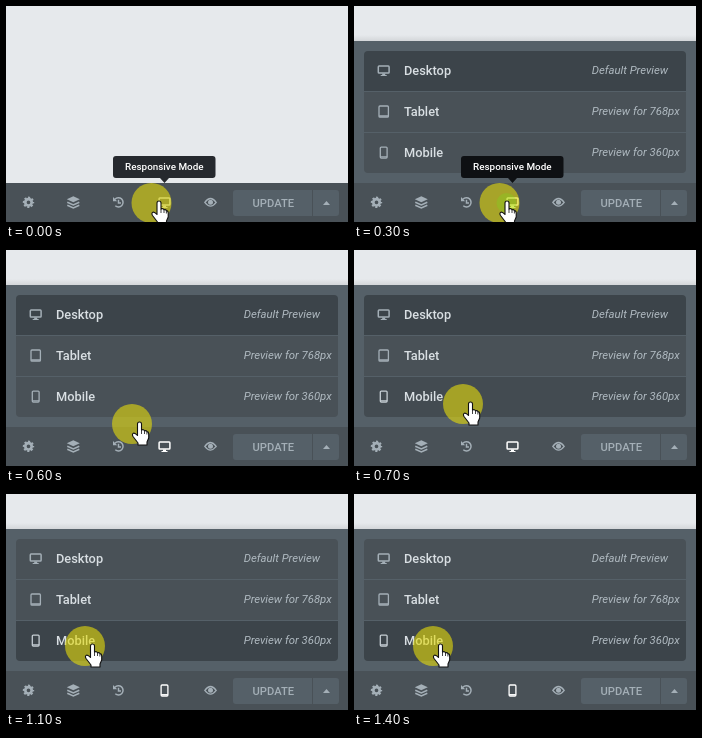
Write an HTML page that moves like this. It is 342 px wide and 216 px high and loops after 1.6 s.

```html
<!DOCTYPE html>
<html>
<head>
<meta charset="utf-8">
<style>
html, body { margin: 0; width: 100%; height: 100%; overflow: hidden; background: #e6e9ec; }
svg { display: block; font-family: Roboto, sans-serif; }
.icon { color: #a4afb7; }
.label { font-size: 12.8px; font-weight: 500; fill: #d9dfe3; }
.note { font-size: 11.35px; font-style: italic; fill: #b0bac1; }
</style>
</head>
<body>
<svg width="342" height="216" viewBox="0 0 342 216">
  <defs>
    <linearGradient id="shade" x2="0" y2="1">
      <stop stop-color="#000" stop-opacity="0"/>
      <stop offset="1" stop-color="#000" stop-opacity=".08"/>
    </linearGradient>
    <clipPath id="card"><rect x="10" y="45" width="322" height="122" rx="4"/></clipPath>
    <g id="desktop">
      <rect x="-5.400" y="-4.500" width="10.800" height="7" rx=".8" fill="none" stroke="currentColor" stroke-width="1.500"/>
      <path d="M-1.500 3h3v1.500h1.500v1h-6v-1h1.500z" fill="currentColor"/>
    </g>
    <g id="tablet" fill="none" stroke="currentColor" stroke-width="1.300">
      <rect x="-4.700" y="-5.600" width="9.400" height="11.200" rx="1"/>
      <path d="M-4.500 4.400h9"/>
    </g>
    <g id="mobile" fill="none" stroke="currentColor" stroke-width="1.300">
      <rect x="-3.400" y="-5.500" width="6.800" height="11" rx="1"/>
      <path d="M-3.400 4.200h6.800"/>
    </g>
  </defs>

  <g id="panel">
    <rect y="29" width="342" height="6" fill="url(#shade)"/>
    <rect y="35" width="342" height="142" fill="#556068"/>
    <g id="rows" clip-path="url(#card)"></g>
  </g>

  <rect y="177" width="342" height="39" fill="#495157"/>
  <g class="icon" fill="currentColor">
    <g transform="translate(22.500 196.300)">
      <circle r="3.200" fill="none" stroke="currentColor" stroke-width="2.700"/>
      <circle r="4.700" fill="none" stroke="currentColor" stroke-width="2" stroke-dasharray="2.100 1.591" stroke-dashoffset="1.050"/>
    </g>
    <g transform="translate(67.300 196.300)">
      <path d="M0-6L6.500-3 0 0-6.500-3z"/>
      <path d="M-6 0L0 2.700 6 0M-6 3L0 5.700 6 3" fill="none" stroke="currentColor" stroke-width="1.500"/>
    </g>
    <g transform="translate(112.500 196.300)" fill="none" stroke="currentColor" stroke-width="1.500">
      <path d="M-3.500-3A4.600 4.600 0 1 1-3.200 3.400M0-2.600V.6H2.500"/>
      <path d="M-5.500-5.200v4.200h4.200z" fill="currentColor" stroke="none"/>
    </g>
    <g transform="translate(204.500 196.300)">
      <path d="M-5.700 0Q0-7.600 5.700 0Q0 7.600-5.700 0z" fill="none" stroke="currentColor" stroke-width="1.300"/>
      <circle r="2.500"/>
    </g>
  </g>
  <path d="M230 184h76v26h-76q-3 0-3-3v-20q0-3 3-3zM307 184h23q3 0 3 3v20q0 3-3 3h-23z" fill="#556068"/>
  <text x="246.500" y="201" font-size="11.200" font-weight="500" fill="#a4afb7">UPDATE</text>
  <path d="M317 199h7l-3.500-4z" fill="#a4afb7"/>
  <use id="device" x="158.500" y="196.500"/>

  <g id="tip">
    <path d="M110 150h96.500q3 0 3 3v16q0 3-3 3h-43.500l-4.500 5-4.500-5h-44q-3 0-3-3v-16q0-3 3-3z"/>
    <text x="119" y="164" font-size="9.900" font-weight="500" fill="#fff">Responsive Mode</text>
  </g>

  <g id="pointer">
    <circle r="20" fill="#e6dc0a" fill-opacity=".6"/>
    <circle id="ripple" cx="7" fill="#6ee21c" fill-opacity=".25"/>
    <g transform="translate(7.500 -2)" stroke="#111">
      <path fill="#fff" stroke-width="1.100" stroke-linejoin="round"
        d="M-2 2a2 2 0 0 1 4 0V8q2.200-1 3 .8q1.700-.7 2.400 .8q1.800 0 1.800 2.400v4l-1.700 4v3h-9v-2l-5-6.500q-1.300-2.400 .4-3.300q1.600-.5 4.100 2.300z"/>
      <path d="M2 8v4M5 9v3M7.400 10v2.500" stroke-width=".8"/>
    </g>
  </g>
</svg>
<script>
const $ = id => document.getElementById(id);
const set = (el, attrs) => { for (const k in attrs) el.setAttribute(k, attrs[k]); };

const modes = [
  ['desktop', 'Desktop', 'Default Preview'],
  ['tablet', 'Tablet', 'Preview for 768px'],
  ['mobile', 'Mobile', 'Preview for 360px']
];
$('rows').innerHTML = modes.map(([icon, label, note], i) => `
  <g transform="translate(0 ${45 + 41 * i})">
    <rect x="10" width="322" height="40"/>
    <use class="icon" href="#${icon}" x="29.700" y="19.600"/>
    <text class="label" x="50" y="24">${label}</text>
    <text class="note" x="237.700" y="23">${note}</text>
  </g>`).join('');
const rows = [...$('rows').children];

const STEP = 100, LOOP = 1600;
const path = [[145.5, 197], [145.5, 196], [126, 174], [109, 154], [89, 152], [79, 152]];
const clicks = [2, 9];

function draw(now) {
  const step = Math.floor(now % LOOP / STEP);
  const open = step >= 3, picked = step >= 10 ? 2 : 0;
  const [x, y] = path[Math.max(0, Math.min(5, step - 4))];

  $('panel').style.display = open ? '' : 'none';
  rows.forEach((row, i) => {
    const hover = i === 2 && step >= 7;
    row.children[0].style.fill = i === picked ? '#3c444a' : hover ? '#434b51' : '#495157';
    row.children[1].style.color = hover ? '#c6ced4' : '';
  });
  set($('device'), { href: '#' + modes[picked][0] });
  $('device').style.color = open ? '#fff' : '#d0d6da';

  $('tip').style.display = step < 6 ? '' : 'none';
  set($('tip'), { fill: open ? '#0e1013' : '#26292e' });

  const age = clicks.map(c => step - c).find(a => a === 0 || a === 1);
  set($('ripple'), { r: age === undefined ? 0 : 5 + 5 * age });
  set($('pointer'), { transform: `translate(${x} ${y})` });
}

const start = performance.now();
function tick() {
  draw(performance.now() - start);
  requestAnimationFrame(tick);
}
tick();
</script>
</body>
</html>
```
